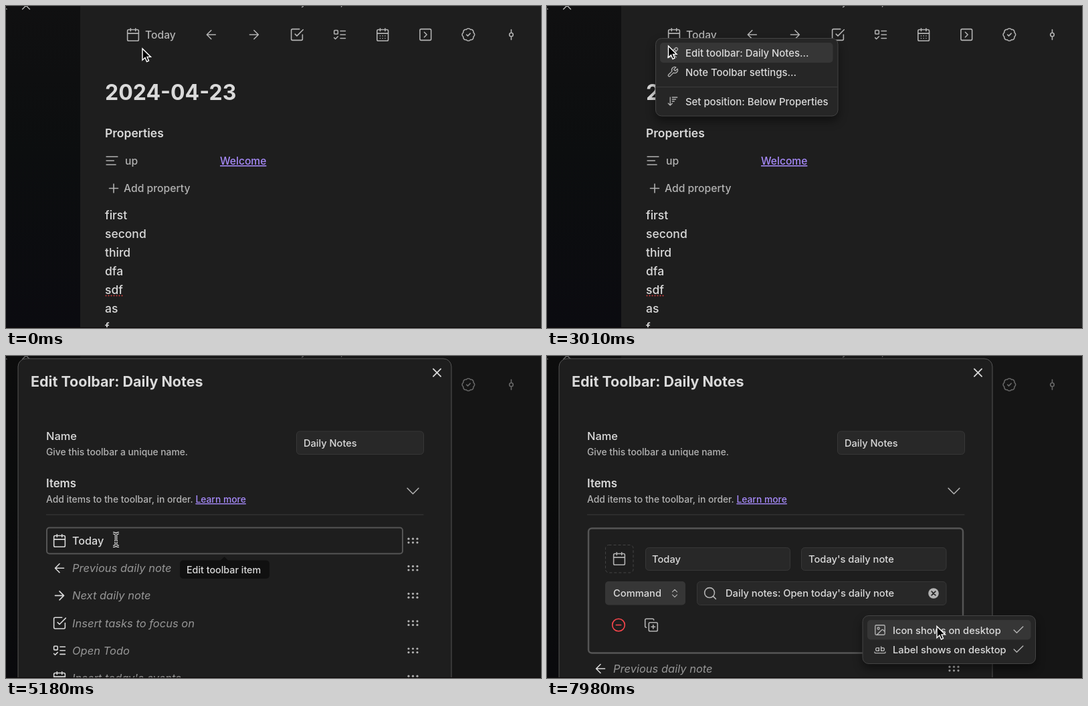
An HTML page that plays this animation: 800x483 px, repeating every 8 s.

```html
<!DOCTYPE html>
<html lang="en">
<head>
<meta charset="utf-8">
<title>Toolbar editor</title>
<style>
  html, body { margin: 0; width: 100%; height: 100%; overflow: hidden; background: #1e1e1e; }
  svg { display: block; width: 800px; height: 483px; }
  text { font-family: Inter, "Open Sans", sans-serif; font-weight: 450; white-space: pre; }
  .icon { fill: none; stroke-linecap: round; stroke-linejoin: round; }
  .menu { filter: drop-shadow(0 7px 7px rgba(0, 0, 0, .45)); }
</style>
</head>
<body>
<svg id="stage" viewBox="0 0 800 483"></svg>
<script>
const LOOP = 8000, STEP = 70;
const TEXT = '#dadada', MUTED = '#b3b3b3', FAINT = '#969696', LINK = '#a68af9', RING = '#555';

const frame = 'M5 4h14a2 2 0 0 1 2 2v14a2 2 0 0 1-2 2H5a2 2 0 0 1-2-2V6a2 2 0 0 1 2-2zM16 2v4M8 2v4M3 10h18';
const square = 'M5 3h14a2 2 0 0 1 2 2v14a2 2 0 0 1-2 2H5a2 2 0 0 1-2-2V5a2 2 0 0 1 2-2z';
const ring = (x, y, r) => `M${x - r} ${y}a${r} ${r} 0 1 0 ${2 * r} 0a${r} ${r} 0 1 0 ${-2 * r} 0`;
const ICONS = {
  calendar: frame,
  days: frame + [8, 12, 16].map(x => `M${x} 14h.01M${x} 18h.01`).join(''),
  left: 'm12 19-7-7 7-7M19 12H5',
  right: 'M5 12h14m-7-7 7 7-7 7',
  task: 'm9 11 3 3L22 4M21 12v7a2 2 0 0 1-2 2H5a2 2 0 0 1-2-2V5a2 2 0 0 1 2-2h11',
  todo: 'M4 5h4a1 1 0 0 1 1 1v4a1 1 0 0 1-1 1H4a1 1 0 0 1-1-1V6a1 1 0 0 1 1-1zm-1 12 2 2 4-4M13 6h8M13 12h8M13 18h8',
  boxed: square + 'm5 5 4 4-4 4',
  badge: 'M3.85 8.62a4 4 0 0 1 4.78-4.77 4 4 0 0 1 6.74 0 4 4 0 0 1 4.78 4.78 4 4 0 0 1 0 6.74 4 4 0 0 1-4.77 4.78 4 4 0 0 1-6.75 0 4 4 0 0 1-4.78-4.77 4 4 0 0 1 0-6.76zM9 12l2 2 4-4',
  commit: 'M12 4v5M12 15v5' + ring(12, 12, 3),
  lines: 'M21 5.5H3M15 12H3M18 18.5H3',
  plus: 'M5 12h14M12 5v14',
  pencil: 'M17 3a2.85 2.83 0 1 1 4 4L7.5 20.5 2 22l1.5-5.5zM15 5l4 4M3 5l5 5M14 16l5 5',
  wrench: 'M14.7 6.3a1 1 0 0 0 0 1.4l1.6 1.6a1 1 0 0 0 1.4 0l3.77-3.77a6 6 0 0 1-7.94 7.94l-6.91 6.91a2.12 2.12 0 0 1-3-3l6.91-6.91a6 6 0 0 1 7.94-7.94l-3.76 3.76z',
  sort: 'm3 16 4 4 4-4M7 20V4M11 4h10M11 8h7M11 12h4',
  close: 'M18 6 6 18M6 6l12 12',
  down: 'm6 9 6 6 6-6',
  updown: 'm7 15 5 5 5-5M7 9l5-5 5 5',
  search: ring(11, 11, 8) + 'M21 21l-4.3-4.3',
  minus: ring(12, 12, 10) + 'M8 12h8',
  copy: 'M10 8h10a2 2 0 0 1 2 2v10a2 2 0 0 1-2 2H10a2 2 0 0 1-2-2V10a2 2 0 0 1 2-2zM4 16c-1.1 0-2-.9-2-2V4c0-1.1.9-2 2-2h10c1.1 0 2 .9 2 2M15 12v6M12 15h6',
  monitor: 'M4 3h16a2 2 0 0 1 2 2v10a2 2 0 0 1-2 2H4a2 2 0 0 1-2-2V5a2 2 0 0 1 2-2zM8 21h8M12 17v4',
  devices: 'M5 8h6a2 2 0 0 1 2 2v10a2 2 0 0 1-2 2H5a2 2 0 0 1-2-2V10a2 2 0 0 1 2-2zM5 4a2 2 0 0 1 2-2h12a2 2 0 0 1 2 2v16a2 2 0 0 1-2 2h-2.4M8 18h.01',
  image: square + ring(9, 9, 2) + 'M21 15l-3.1-3.1a2 2 0 0 0-2.8 0L6 21',
  label: ring(7, 12, 3) + 'M10 9v6' + ring(17, 12, 3) + 'M14 7v8M22 17v1c0 .5-.5 1-1 1H3c-.5 0-1-.5-1-1v-1',
  check: 'M20 6 9 17l-5-5'
};

const icon = (name, x, y, color = MUTED, size = .93, weight = 1.7) =>
  `<path class="icon" d="${ICONS[name]}" stroke="${color}" stroke-width="${weight}"
    transform="translate(${x} ${y}) scale(${size}) translate(-12 -12)"/>`;
const text = (s, x, y, size, color = TEXT, attrs = '') =>
  `<text x="${x}" y="${y}" font-size="${size}" fill="${color}" ${attrs}>${s}</text>`;
const box = (x, y, x2, y2, r, fill, stroke = 'none', w = 1, attrs = '') =>
  `<rect x="${x}" y="${y}" width="${x2 - x}" height="${y2 - y}" rx="${r}" fill="${fill}"
    stroke="${stroke}" stroke-width="${w}" ${attrs}/>`;
const field = (x, y, x2, y2) => box(x + .5, y + .5, x2 - .5, y2 - .5, 5, '#282828', '#373737');
const focus = (x, y, x2, y2) => box(x, y, x2, y2, 6, 'none', RING, 3);
const grip = (x, y) => [-6.5, 0, 6.5].map(dx => [-2.8, 2.8].map(dy =>
  `<circle cx="${x + dx}" cy="${y + dy}" r="1.6" fill="${MUTED}"/>`).join('')).join('');
const group = (id, ...parts) => `<g id="${id}">${parts.join('')}</g>`;
const weight = w => `style="font-weight:${w}"`;
const bold = weight(700), semi = weight(600), medium = weight(500);
const link = 'text-decoration="underline"';

function row(name, label, y, named) {
  return icon(name, 80, y, TEXT) + grip(608.5, y) +
    (named ? text(label, 99, y + 6, 16.2) : text(label, 99, y + 6, 16.5, FAINT, 'font-style="italic"'));
}

const page = group('page',
  box(0, 0, 800, 483, 0, '#1e1e1e'),
  box(0, 0, 111, 483, 0, 'url(#side)'),
  icon('down', 30, 2, MUTED, -.9),
  '<path d="M0 4l1.5 1M445 -1q-1 3-3 2.5M502 -1q0 2-1 2.5" stroke="#aaa" fill="none" stroke-width="1.3"/>',
  icon('calendar', 190, 43), text('Today', 208, 49, 15.7, MUTED),
  ['left', 'right', 'task', 'todo', 'days', 'boxed', 'badge', 'commit']
    .map((name, i) => icon(name, 306.8 + i * 64.1, 43)).join(''),
  text('2024-04-23', 148, 141, 32, TEXT, bold),
  text('Properties', 148, 197, 17.5, TEXT, semi),
  icon('lines', 158.5, 232), text('up', 178, 238, 15.7, MUTED),
  text('Welcome', 320, 238, 15.6, LINK, link),
  icon('plus', 161, 273.5), text('Add property', 176, 279, 15.7, MUTED),
  ['first', 'second', 'third', 'dfa', 'sdf', 'as', 'f']
    .map((s, i) => text(s, 148, 320 + 28 * i, 17.5)).join(''),
  '<path d="M149.5 434.5H176" stroke="#d33c3c" stroke-width="2" stroke-linecap="round" stroke-dasharray="0 4"/>');

const barMenu = group('barMenu',
  `<g class="menu">${box(162.5, 48.5, 435, 165, 9, '#262626', '#444')}</g>`,
  box(169, 55, 427.5, 85, 5, '#363636'),
  icon('pencil', 188, 70, MUTED, .75), text('Edit toolbar: Daily Notes...', 207, 75.5, 14.9),
  icon('wrench', 188, 99, MUTED, .75), text('Note Toolbar settings...', 207, 104.5, 14.9),
  box(163, 121, 434.5, 122, 0, '#3b3b3b'),
  icon('sort', 188, 143, MUTED, .75), text('Set position: Below Properties', 207, 148.5, 14.9));

const rows = group('rows',
  [['calendar', 'Today'], ['left', 'Previous daily note'], ['right', 'Next daily note'],
   ['task', 'Insert tasks to focus on'], ['todo', 'Open Todo'], ['days', "Insert today's events"]]
    .map(([name, label], i) => row(name, label, 277 + 41.2 * i, i === 0)).join(''),
  group('rowHover', box(61, 257.5, 593, 296.5, 4, 'none', RING, 2)),
  group('tip', box(260, 306.5, 394, 334, 5, '#101010'),
    '<path d="M320.5 307l6-6 6 6z" fill="#101010"/>',
    text('Edit toolbar item', 270, 325.5, 14.3, TEXT, medium)));

const form = group('form',
  box(62, 258.5, 622, 445.5, 5, 'none', RING, 2.5),
  box(87.5, 283.5, 129, 325, 5, 'none', '#444', 1, 'stroke-dasharray="4 3"'),
  icon('calendar', 108, 304),
  field(147, 287, 364, 322), text('Today', 157, 310, 14.7),
  group('nameFocus', focus(146, 286.5, 364, 322), box(198, 295, 199.3, 314, 0, TEXT)),
  field(380, 287, 597.5, 322), text("Today's daily note", 391, 310, 14.7),
  box(87, 338, 207, 373.5, 5, '#363636'), text('Command', 99, 361, 14.7),
  icon('updown', 191, 356, MUTED, .7),
  field(224, 338, 597.5, 374), icon('search', 244, 356),
  text("Daily notes: Open today's daily note", 267, 361, 14.7),
  `<circle cx="578" cy="356" r="7.8" fill="${MUTED}"/>`, icon('close', 578, 356, '#222', .48, 3.4),
  icon('minus', 107, 403.5, '#fb464c'), icon('copy', 156, 403.5),
  group('deskHover', box(470, 386, 508.5, 420.5, 5, '#333')),
  icon('monitor', 489, 403.5), icon('devices', 537.5, 403.5), grip(581.5, 403.5),
  row('left', 'Previous daily note', 469));

const modal = group('modal',
  box(0, 0, 800, 483, 0, '#0a0a0a', 'none', 1, 'opacity=".45"'),
  box(18, 4, 666, 520, 12, '#1e1e1e', '#555'),
  text('Edit Toolbar: Daily Notes', 37, 46, 21.5, TEXT, bold),
  icon('close', 644.5, 25, TEXT, .93, 2),
  text('Name', 60, 125.5, 16.4, TEXT, medium),
  text('Give this toolbar a unique name.', 60, 149, 13.8, MUTED),
  field(434, 112.5, 625, 148), text('Daily Notes', 445, 136, 14.6),
  group('titleFocus', focus(433.5, 112, 625, 148.5)),
  text('Items', 60, 196.5, 16.8, TEXT, semi),
  text(`Add items to the toolbar, in order. <tspan fill="${LINK}" ${link}>Learn more</tspan>`, 60, 220, 13.87, MUTED),
  icon('down', 608.5, 202.5, MUTED, 1.4, 1.1),
  box(60, 237.5, 624.5, 238.5, 0, '#3b3b3b'),
  rows, form);

const deskMenu = group('deskMenu',
  `<g class="menu">${box(472, 389.5, 730.5, 461.5, 9, '#262626', '#444')}</g>`,
  box(479, 396, 723.5, 425.5, 5, '#363636'),
  icon('image', 498, 411, MUTED, .8), text('Icon shows on desktop', 517, 416.5, 14.7),
  icon('label', 498, 440, MUTED, .8), text('Label shows on desktop', 517, 445.5, 14.7),
  icon('check', 705, 411, MUTED, .85), icon('check', 705, 440, MUTED, .85));

const beam = 'M-4.5-10q4.500 0 4.500 3v14q0 3-4.500 3M4.500-10q-4.500 0-4.500 3M4.500 10q-4.500 0-4.500-3M-2.500 3h5';
const pointer = group('pointer',
  group('arrow', '<path d="M0 0V17.2l4-3.7 2.5 6 3-1.3-2.5-5.8h5.5z" fill="#000" stroke="#fff" stroke-width="1.4"/>'),
  group('beam', `<path d="${beam}" fill="none" stroke="#fff" stroke-width="3.4"/>
    <path d="${beam}" fill="none" stroke="#111" stroke-width="1.3"/>`));

const stage = document.getElementById('stage');
stage.innerHTML = `<defs><linearGradient id="side" x2="0" y2="1">
  <stop stop-color="#101011"/><stop offset=".45" stop-color="#0c0e0f"/><stop offset="1" stop-color="#0b0b10"/>
  </linearGradient></defs>` + page + modal + barMenu + deskMenu + box(0, 482, 800, 483, 0, '#0c0808') + pointer;

// Visible intervals in ms
const SHOWN = {
  barMenu: [2590, 3220], modal: [3290, LOOP], titleFocus: [3290, 4970],
  rows: [0, 5250], rowHover: [4480, 5250], tip: [4760, 5250],
  form: [5250, LOOP], nameFocus: [5250, 6790], deskHover: [6370, 7000], deskMenu: [7000, LOOP],
  beam: [4480, 5250]
};
// Pointer stops: time, x, y
const PATH = [
  [0, 204, 64], [350, 170, 66], [1470, 170, 66], [1960, 160, 44], [2030, 160, 44], [2380, 161, 47],
  [2800, 161, 47], [3010, 181.5, 60], [3220, 181.5, 60], [3570, 280, 160], [3850, 280, 160],
  [3920, 316.5, 197.5], [4620, 164.5, 275.5], [5740, 164.5, 275.5], [6440, 490.5, 401.5],
  [7770, 490.5, 401.5], [7980, 583, 405.5], [LOOP, 583, 405.5]
];
const el = id => document.getElementById(id);
const show = (id, on) => el(id).setAttribute('display', on ? 'inline' : 'none');

function pointerAt(t) {
  const i = Math.max(1, PATH.findIndex(p => p[0] >= t));
  const [t0, x0, y0] = PATH[i - 1], [t1, x1, y1] = PATH[i];
  const u = (t - t0) / (t1 - t0), k = u * u * (3 - 2 * u);
  return `translate(${x0 + (x1 - x0) * k} ${y0 + (y1 - y0) * k})`;
}

function draw(now) {
  const t = Math.floor(now % LOOP / STEP) * STEP;
  for (const id in SHOWN) show(id, t >= SHOWN[id][0] && t < SHOWN[id][1]);
  show('arrow', t < SHOWN.beam[0] || t >= SHOWN.beam[1]);
  el('pointer').setAttribute('transform', pointerAt(t));
}
const start = performance.now();
function tick() {
  draw(performance.now() - start);
  requestAnimationFrame(tick);
}
tick();
</script>
</body>
</html>
```
